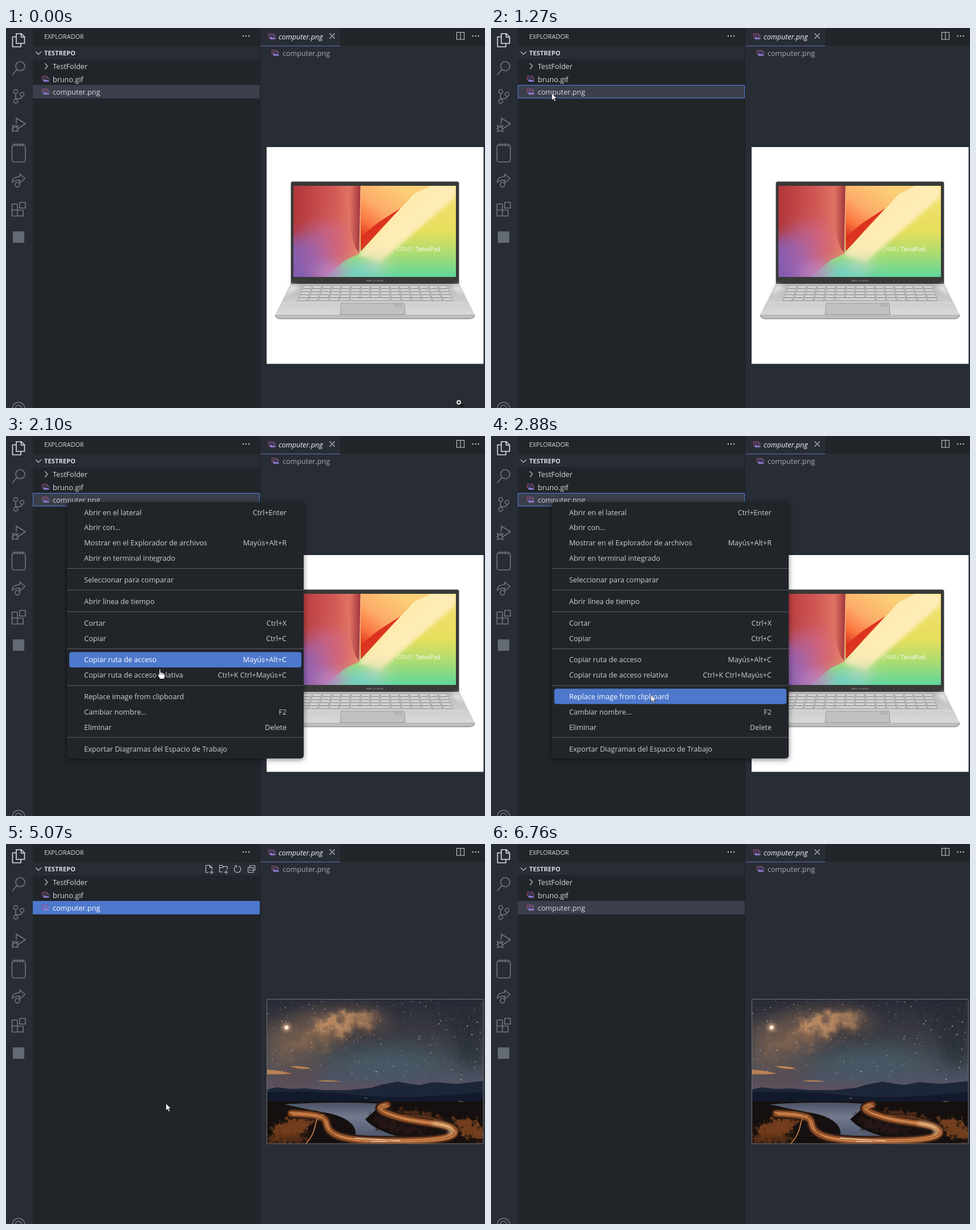
An HTML page for the animation above (6.84 s loop, 840 by 667 pixels).

```html
<!DOCTYPE html>
<html lang="es">
<head>
<meta charset="utf-8">
<title>Explorador</title>
<style>
html, body { margin: 0; width: 100%; height: 100%; overflow: hidden; background: #282c34; }
svg { display: block; width: 100vw; height: 100vh; }
text { font: 12.6px "Open Sans", "Noto Sans", sans-serif; fill: #d7dae0; white-space: pre; }
.line { fill: none; stroke: #727780; stroke-width: 1.6; stroke-linejoin: round; }
.thin { fill: none; stroke: #c8cbd0; stroke-width: 1.1; }
.dots { fill: #c8cbd0; }
#menu { filter: drop-shadow(0 2px 5px rgba(0, 0, 0, .5)); }
#menu text { fill: #cccfd4; }
#menu text.on { fill: #fff; }
</style>
</head>
<body>
<svg viewBox="0 0 840 667">
<defs>
  <linearGradient id="red"><stop stop-color="#b2363a"/><stop offset=".6" stop-color="#d25a56"/><stop offset="1" stop-color="#e8856c"/></linearGradient>
  <linearGradient id="lime" x2="0" y2="1"><stop stop-color="#f7df74"/><stop offset=".5" stop-color="#e6de5c"/><stop offset=".75" stop-color="#a9dc72"/><stop offset="1" stop-color="#5fd69c"/></linearGradient>
  <linearGradient id="flame" gradientUnits="userSpaceOnUse" x1="690" y1="277" x2="626" y2="372"><stop stop-color="#fbcf78"/><stop offset=".45" stop-color="#fdac68"/><stop offset=".75" stop-color="#f9743f"/><stop offset="1" stop-color="#d92a1a"/></linearGradient>
  <linearGradient id="metal" x2="0" y2="1"><stop stop-color="#b4b4b5"/><stop offset=".55" stop-color="#cbcbcc"/><stop offset="1" stop-color="#d9d9da"/></linearGradient>
  <linearGradient id="fold"><stop stop-color="#8e1c2c" stop-opacity="0"/><stop offset="1" stop-color="#8e1c2c" stop-opacity=".8"/></linearGradient>
  <linearGradient id="sky" x2="0" y2="1"><stop stop-color="#282a36"/><stop offset=".35" stop-color="#393a42"/><stop offset=".7" stop-color="#465059"/><stop offset=".86" stop-color="#4f5364"/><stop offset="1" stop-color="#64525f"/></linearGradient>
  <linearGradient id="lake" x2="0" y2="1"><stop stop-color="#4c5265"/><stop offset=".4" stop-color="#737a8e"/><stop offset="1" stop-color="#4c566c"/></linearGradient>
  <filter id="soft" x="-50%" y="-50%" width="200%" height="200%"><feGaussianBlur stdDeviation="3"/></filter>
  <filter id="haze" x="-80%" y="-80%" width="260%" height="260%"><feGaussianBlur stdDeviation="13"/></filter>
  <filter id="cloud" x="-30%" y="-60%" width="160%" height="220%">
    <feGaussianBlur stdDeviation="7" result="b"/>
    <feTurbulence type="fractalNoise" baseFrequency=".045" numOctaves="4" seed="4"/>
    <feDisplacementMap in="b" scale="50" xChannelSelector="R" yChannelSelector="G"/>
  </filter>
  <filter id="grass" x="-30%" y="-30%" width="160%" height="160%">
    <feGaussianBlur stdDeviation="2.5" result="b"/>
    <feTurbulence type="fractalNoise" baseFrequency=".13" numOctaves="3" seed="9"/>
    <feDisplacementMap in="b" scale="28" xChannelSelector="R" yChannelSelector="G"/>
  </filter>
  <clipPath id="screen"><path d="M504 277H789V437H504Z"/></clipPath>
  <clipPath id="photo"><path d="M457 272H837V526H457Z"/></clipPath>
  <g id="pic">
    <path d="M1.500 7.500H.5V.5H9.500V2" fill="none" stroke="#b04e78"/>
    <path d="M3 9.500V3H12V9.500" fill="none" stroke="#8570c4" stroke-width=".8"/>
    <path d="M2.600 10.300V8.500L5.500 5.500 8 8l1.500-1 2.900 2v1.300z" fill="#957bd6"/>
    <circle cx="9.700" cy="4.800" r=".9" fill="#d0557c"/>
  </g>
  <g id="more" class="dots"><circle r="1.200"/><circle cx="5" r="1.200"/><circle cx="10" r="1.200"/></g>
</defs>

<path d="M0 0H840V667H0Z" fill="#282c34"/>
<path d="M47 0H445V667H47Z" fill="#212529"/>
<path d="M47 32H445V55H47Z" fill="#282c34"/>
<path d="M446 0H840V31H446Z" fill="#212529"/>
<path d="M446 0H586V31H446Z" fill="#282c34"/>
<path d="M446 31.500H586" stroke="#6272b4"/>
<path d="M445.500 0V667" stroke="#1b1e23"/>

<g class="line">
  <path d="M18 10h9l5.500 5.500V27H18zM26.500 10v6h6M18 15.500h-6.500V33H26v-6" stroke="#dde0e5"/>
  <circle cx="25" cy="67" r="8"/><path d="M19 73l-8 9.500"/>
  <circle cx="17" cy="111.500" r="3.500"/><circle cx="17" cy="128.500" r="3.500"/><circle cx="28" cy="116.500" r="3.500"/>
  <path d="M17 115v10M28 120c0 4-3 4-6 4h-5"/>
  <path d="M18 168v-10l16 10-12 8"/>
  <ellipse cx="16" cy="176" rx="4" ry="5.200"/><path d="M12 174h8M10 171l3 2M22 171l-3 2M9.500 177H12M20 177h3M10 182l3-2M22 182l-3-2"/>
  <rect x="10.500" y="205" width="23.500" height="30" rx="4"/><path d="M15 202v6M20 202v6M25 202v6M30 202v6"/>
  <path d="M11 271c0-7 5-10 13-10v-5l9.500 8-9.500 8v-5c-6 0-10 1-13 4z"/><circle cx="20" cy="275" r="4"/>
  <path d="M10.500 309h9.500v10.500h10V330H10.500zM10.500 319.500H20V330M24 306h10v10H24z"/>
  <circle cx="22" cy="668" r="11"/><circle cx="22" cy="667" r="5"/>
</g>
<rect x="12" y="357" width="20" height="20" fill="#646a73"/>

<text x="67" y="19" style="font-size:10.900px">EXPLORADOR</text>
<text x="67" y="48" style="font-size:11.200px;font-weight:700">TESTREPO</text>
<use href="#more" x="416" y="14"/>
<path class="thin" d="M52 41.500l5 5 5-5M68 62l5 5-5 5"/>
<g class="thin" id="tools">
  <path d="M355 50h-4.500V37.500h7l4 4V45M357.500 37.500v4h4M360.500 46v7M357 49.500h7"/>
  <path d="M380 49h-5.500V37.500h5l1.500 2h7V45M374.500 41.500h6l1.500-2M386 46v7M382.500 49.500h7"/>
  <path d="M402.500 39.500a5.800 5.800 0 1 0 6-.500M401 38h3.500v3.500"/>
  <path d="M427.500 41v-3h9v8h-3M424.500 41.500h9V50h-9zM426.500 45.700h5"/>
</g>

<rect id="row" x="47.500" y="100.500" width="397" height="22.500"/>
<text x="82" y="72">TestFolder</text>
<text x="82" y="94.500">bruno.gif</text>
<text id="file" x="82" y="117">computer.png</text>
<use href="#pic" x="63" y="84"/>
<use href="#pic" x="63" y="106.500"/>
<use href="#pic" x="460" y="9.500"/>
<use href="#pic" x="466" y="38.500"/>
<text x="478" y="20" style="font-style:italic;fill:#f0f1f3">computer.png</text>
<text x="485" y="48.500" style="fill:#a6acb6">computer.png</text>
<path class="thin" d="M567.500 9.500l9 9M576.500 9.500l-9 9M790.500 7.500h13v12.500h-13zM797 7.500V20"/>
<use href="#more" x="818.500" y="14"/>

<g id="laptop">
  <path d="M457 209H837.500V589.500H457Z" fill="#fff"/>
  <path d="M499.500 449V273q0-3.500 3.500-3.500H791q3.500 0 3.500 3.500V449Z" fill="#383a38"/>
  <g clip-path="url(#screen)">
    <path d="M504 277H789V437H504Z" fill="url(#lime)"/>
    <path d="M618 398L736 277H789V296L655 412Z" fill="#fdecb6" filter="url(#soft)"/>
    <path d="M621 277H746L715 292 622 392Z" fill="url(#flame)"/>
    <path d="M622 390V366L652 342 692 316Z" fill="#dc3320"/>
    <path d="M621 394L716 291 745 277H772Z" fill="#fdebb2"/>
    <path d="M504 277H622L620 396 595 408 560 437H504Z" fill="url(#red)"/>
    <g filter="url(#haze)">
      <ellipse cx="512" cy="420" rx="48" ry="54" fill="#7b60bd" opacity=".9"/>
      <ellipse cx="568" cy="375" rx="28" ry="36" fill="#d06a92" opacity=".65"/>
      <ellipse cx="540" cy="390" rx="28" ry="44" fill="#a864a4" opacity=".6"/>
      <ellipse cx="570" cy="430" rx="28" ry="18" fill="#bd84c4"/>
      <ellipse cx="630" cy="428" rx="38" ry="15" fill="#74cfc7"/>
      <ellipse cx="650" cy="408" rx="24" ry="9" fill="#dbe2a5"/>
    </g>
    <path d="M602 277H622L620 394Q600 382 602 277Z" fill="url(#fold)"/>
    <path d="M622 277L620 393" stroke="#f5c19b"/>
  </g>
  <text x="685" y="392" style="font-size:10.500px;font-weight:300;fill:#fff">ORMU <tspan font-weight="500">TelvaPad</tspan></text>
  <text x="646" y="444.500" text-anchor="middle" style="font-size:4.200px;fill:#a5a7a5">ORMU TelvaPad</text>
  <path d="M499.500 449H794.500L822 503H472Z" fill="url(#metal)"/>
  <path d="M499.500 449L490 470 517 456ZM794.500 449L804 470 779 456Z" fill="#e2e2e3" filter="url(#soft)"/>
  <path d="M472 503H822q0 7-9 7.500H481q-9-.500-9-7.500Z" fill="#bcbcbd"/>
  <path d="M472 504q1 6 9 6.500H813q8-.500 9-6.500" fill="none" stroke="#77787a"/>
  <path d="M520 452H775L785 480H509Z" fill="#bcbcbd"/>
  <g id="keys" fill="#dedee0" stroke="#8e8e90" stroke-width=".7"/>
  <path d="M482 482H812" stroke="#dfdfe0"/>
  <path d="M588 483H698L700 503H586Z" fill="#c1c1c2" stroke="#97979a"/>
  <path d="M682 485h12v3.500h-12z" fill="none" stroke="#929295" stroke-width=".8"/>
</g>

<g id="night">
  <g clip-path="url(#photo)">
    <path d="M457 272H837V436H457Z" fill="url(#sky)"/>
    <g filter="url(#haze)">
      <path d="M457 320L540 290 640 288 680 315 600 340 540 375 457 390Z" fill="#7a604f" opacity=".65"/>
      <path d="M457 385H570L530 425H457Z" fill="#5f4a4c" opacity=".7"/>
      <ellipse cx="670" cy="385" rx="85" ry="22" fill="#475d68" opacity=".7"/>
      <path d="M760 272H837V390H800Z" fill="#262936" opacity=".7"/>
    </g>
    <g filter="url(#cloud)">
      <path d="M480 350L530 325 560 305 640 296 660 312 600 330 550 350 490 368Z" fill="#8f6a50" opacity=".6"/>
      <path d="M535 330L562 304 606 302 640 310 590 326Z" fill="#c79467" opacity=".85"/>
      <path d="M570 345L620 318 670 312 620 345Z" fill="#38363c" opacity=".55"/>
    </g>
    <circle cx="492" cy="322" r="7" fill="#e6b68c" opacity=".8" filter="url(#soft)"/>
    <circle cx="492" cy="322" r="3.500" fill="#fff0d5"/>
    <g id="stars" fill="#eee6df"/>
    <path d="M457 396Q480 397 502 403 478 405 457 404ZM498 390Q520 389 535 394 515 397 498 390ZM545 416Q565 413 588 417 565 418 545 416Z" fill="#c98b55" opacity=".85"/>
    <path d="M457 431L475 427 500 430 525 429 560 432 600 432 640 428 660 422 687 417 708 421 725 423 750 418 790 421 837 416V460H457Z" fill="#1d2639"/>
    <path d="M457 436Q540 432 620 441T837 435V470H457Z" fill="#111a2a"/>
    <path d="M457 452H837V526H457Z" fill="#15100f"/>
    <path d="M488 457Q580 451 660 456L648 467 630 483Q645 502 690 514L612 516Q617 498 600 486T550 470Z" fill="url(#lake)"/>
    <g filter="url(#grass)">
      <path d="M465 500L500 481 540 479 525 508 475 520Z" fill="#8a4820" opacity=".8"/>
      <path d="M457 514L490 506 530 514 515 526H457Z" fill="#613318" opacity=".8"/>
      <path d="M780 483L815 482 837 500V522L805 512Z" fill="#8a4a20" opacity=".8"/>
      <path d="M685 466Q730 468 775 484L755 490 690 477Z" fill="#5d3019" opacity=".8"/>
      <path d="M640 478L690 488 750 503 700 510 655 497Z" fill="#251815"/>
    </g>
    <g id="road" fill="none" stroke-linecap="round"/>
    <path d="M612 516l80 5M640 522h28" stroke="#f8e9d6"/>
    <path d="M628 446h6M793 452h9" stroke="#c4a284" opacity=".7"/>
  </g>
  <path d="M457.500 272.500H837V526H457.500Z" fill="none" stroke="#77706e"/>
</g>

<g id="menu">
  <rect x="107" y="116" width="415" height="450" rx="5" fill="#212529"/>
  <rect id="hot" x="111" width="407" height="27" rx="4" fill="#4d78cc"/>
  <path d="M107 232.500h415m-415 38h415m-415 38h415m-415 65h415m-415 64.500h415m-415 91h415" stroke="#5a5e64"/>
</g>

<g id="arrow"><path d="M.5.5V13l2.900-2.800 2 4.600 2-.9-2-4.400H9.300Z" fill="#fff" stroke="#111" stroke-width=".7"/></g>
<g id="hand"><path d="M2.500 1.200Q4.500-.500 5 1.500V6q3-.500 3.500 1 2-.500 2.300 1 2 0 2 2v3l-1.500 4.500H4L1 12.500Q-1 9 .500 8.500L2.500 10Z" fill="#fff" stroke="#111"/><path d="M5.500 7v3M8.300 8v2.500M10.600 9v2" stroke="#111" stroke-width=".7"/></g>
<g id="zoom"><path d="M3 3l4.500 4.500" stroke="#0b0c0e" stroke-width="2.500"/><circle r="4.500" fill="#fff" stroke="#111"/><path d="M-2.500 0h5M0-2.500v5" stroke="#111" stroke-width="1.400"/></g>
</svg>
<script>
const LOOP = 6840, STEP = 70;
const $ = id => document.getElementById(id);
const add = (id, markup) => $(id).insertAdjacentHTML('beforeend', markup);
const show = (id, on) => { $(id).style.display = on ? '' : 'none'; };
const mix = (a, b, p) => a + (b - a) * p;

const items = [
  [134, 'Abrir en el lateral', 'Ctrl+Enter'],
  [160.5, 'Abrir con...'],
  [187.5, 'Mostrar en el Explorador de archivos', 'Mayús+Alt+R'],
  [214, 'Abrir en terminal integrado'],
  [252, 'Seleccionar para comparar'],
  [290.5, 'Abrir línea de tiempo'],
  [328.5, 'Cortar', 'Ctrl+X'],
  [355, 'Copiar', 'Ctrl+C'],
  [392.7, 'Copiar ruta de acceso', 'Mayús+Alt+C'],
  [419.7, 'Copiar ruta de acceso relativa', 'Ctrl+K Ctrl+Mayús+C'],
  [457, 'Replace image from clipboard'],
  [484.5, 'Cambiar nombre...', 'F2'],
  [511, 'Eliminar', 'Delete'],
  [549.5, 'Exportar Diagramas del Espacio de Trabajo']
];
const labels = items.map(([y, name, keys = '']) =>
  `<text x="137" y="${y + 4.7}">${name}</text><text x="492" y="${y + 4.7}" text-anchor="end">${keys}</text>`);
add('menu', labels.join(''));
const menuText = [...$('menu').querySelectorAll('text')];

function drawKeys() {
  let d = '';
  for (let r = 0; r < 5; r++) {
    const y = 453 + r * 5.3, left = 520 - r * 2.1, w = (255 + r * 4.2) / 15;
    for (let k = 0; k < 15; k++) {
      if (r === 4 && k > 4 && k < 9) continue;
      d += `M${left + k * w + 1.5} ${y}h${w - 3}l1 3.600h${1 - w}z`;
    }
    if (r === 4) d += `M${left + 5 * w + 1} ${y}h${4 * w - 2}v3.600h${2 - 4 * w}z`;
  }
  add('keys', `<path d="${d}"/>`);
}

function drawStars() {
  let seed = 17, out = '';
  const rnd = () => (seed = seed * 16807 % 2147483647) / 2147483647;
  for (let i = 0; i < 750; i++) {
    const x = 457 + rnd() * 380, y = 272 + rnd() ** 1.2 * 142;
    out += `<circle cx="${x}" cy="${y}" r="${0.3 + rnd() ** 5 * .7}" opacity="${0.25 + rnd() * .65}"/>`;
  }
  add('stars', out);
}

function drawRoad() {
  const main = 'M668 458C645 463 656 470 690 480S785 490 787 504 740 521 690 521 590 522 570 505 585 476 500 473';
  const side = 'M556 476C535 482 552 496 526 526';
  const verge = 'M690 476C740 478 790 484 808 518';
  const stroke = (d, color, width, extra = '') => `<path d="${d}" stroke="${color}" stroke-width="${width}" ${extra}/>`;
  const trails = [-4, -2, 0, 2, 4].map((o, i) =>
    stroke(main, i % 2 ? '#f3bd82' : '#b9622f', .9, `transform="translate(${o} ${o * .7})"`));
  add('road', stroke(main, '#2b1a14', 17) + stroke(main, '#7d4423', 11) +
    stroke(main, '#d07a38', 4, 'opacity=".7" filter="url(#soft)"') + trails.join('') +
    stroke(side, '#a0592c', 2) + stroke(side, '#d8a36c', .7) + stroke(verge, '#94522b', 1) +
    stroke('M750 490Q790 496 778 508', '#ffdfa8', 4, 'filter="url(#soft)"'));
}

// time, x, y of the pointer
const path = [
  [70, 0, 76], [210, 0, 76], [420, 42, 121], [630, 106, 114],
  [1680, 106, 114], [1890, 170, 250], [2100, 266, 409], [2380, 274, 440], [2450, 277, 448],
  [2660, 280, 454], [2900, 280, 454], [2940, 280, 455],
  [5460, 280, 455], [5600, 350, 448], [5810, 570, 592]
];

function pointer(t) {
  const q = t - t % STEP;
  const i = path.findIndex(k => k[0] > q);
  if (i === 0) return path[0].slice(1);
  if (i < 0) return path[path.length - 1].slice(1);
  const [a, b] = [path[i - 1], path[i]], p = (q - a[0]) / (b[0] - a[0]);
  return [mix(a[1], b[1], p), mix(a[2], b[2], p)];
}

function render(t) {
  const [x, y] = t < 70 ? [794, 657] : pointer(t);
  const visible = t < 2950 || (t >= 4070 && t < 5880);
  const overImage = x > 457 && y < 527;
  const kind = t < 70 || overImage ? 'zoom' : t >= 1750 && t < 2810 ? 'hand' : 'arrow';
  for (const id of ['arrow', 'hand', 'zoom']) show(id, visible && id === kind);
  $(kind).setAttribute('transform', `translate(${x} ${y})`);

  const active = t >= 2950 && t < 6760;
  const outlined = t >= 1140 && t < 2950;
  const fill = active ? '#4d78cc' : '#3a3f4b';
  $('row').setAttribute('fill', fill);
  $('row').setAttribute('stroke', outlined ? '#5283e0' : fill);
  $('file').style.fill = active ? '#fff' : '';
  show('tools', active || (t < 1140 && t >= 70 && x > 47));

  const open = t >= 1350 && t < 2950;
  show('menu', open);
  $('menu').style.opacity = t < 1420 ? .6 : 1;
  const hot = open ? items.findIndex(([top]) => Math.abs(y - 4 - top) <= 13.5) : -1;
  show('hot', hot >= 0);
  if (hot >= 0) $('hot').setAttribute('y', items[hot][0] - 13.5);
  menuText.forEach((label, i) => label.classList.toggle('on', i >> 1 === hot));

  show('laptop', t < 5070);
  show('night', t >= 5070);
}

drawKeys();
drawStars();
drawRoad();
const start = performance.now();
function tick() {
  render((performance.now() - start) % LOOP);
  requestAnimationFrame(tick);
}
tick();
</script>
</body>
</html>
```
